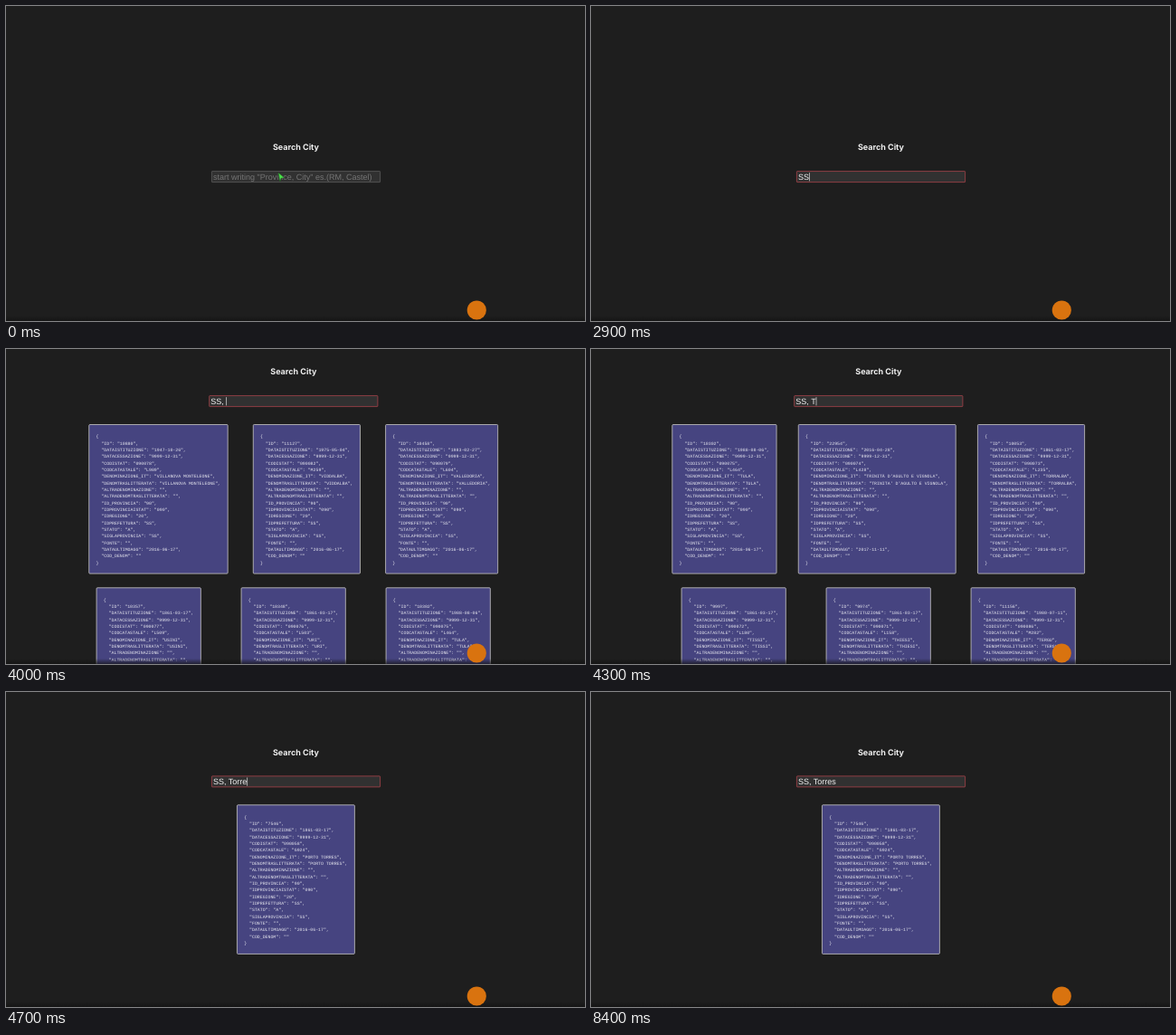
Recreate the animation shown at these times as an HTML page. Size 640x348 px, loop 8.9 s.

```html
<!DOCTYPE html>
<html lang="en">
<head>
<meta charset="utf-8">
<title>Search City</title>
<style>
  html, body { margin: 0; width: 100%; height: 100%; overflow: hidden; background: #1e1e1e; }
  svg { display: block; width: 640px; height: 348px; }
  text { white-space: pre; text-rendering: geometricPrecision; }
  .title { font: 700 9px Inter, sans-serif; fill: #f0f0f0; text-anchor: middle; }
  .field { font: 9px "Liberation Sans", Arial, sans-serif; fill: #f2f2f2; }
  #hint { fill: #757575; }
  #box { fill: #313131; stroke-width: .8; }
  .card rect { fill: #464480; stroke: #c9c8c4; stroke-width: .8; }
  .card text { font: 4.89px "Liberation Mono", "Courier New", monospace; fill: #e6e6ee; }
</style>
</head>
<body>
<svg viewBox="0 0 640 348">
  <defs>
    <linearGradient id="shade" x2="0" y2="1">
      <stop offset="0" stop-color="#111" stop-opacity="0"/>
      <stop offset="1" stop-color="#111" stop-opacity=".7"/>
    </linearGradient>
  </defs>
  <g id="page">
    <text class="title" x="320.5" y="3.4">Search City</text>
    <rect id="box" x="227.4" y="26.6" width="186.2" height="12" rx=".6"/>
    <text id="hint" class="field" x="229" y="36">start writing "Province, City" es.(RM, Castel)</text>
    <text id="value" class="field" x="229" y="36"></text>
    <rect id="caret" y="28.2" width=".7" height="9.2" fill="#ddd"/>
    <g id="cards"></g>
  </g>
  <path id="pointer" d="M301 184l6.6 5.8-3.5.4-1.2 3.8z" fill="#4be04b" stroke="#1b3a1b" stroke-width=".4"/>
  <rect y="342" width="640" height="6" fill="url(#shade)"/>
  <circle cx="520.3" cy="336" r="10.6" fill="#d9730f"/>
</svg>
<script>
const LOOP = 8900, FOCUS = 300, BLINK = 500;
const LINE = 7.34, CHAR = 4.89 * 0.6, PAD = 7.75, CARD_H = 164.6, ROW = 180.3, GRID_W = 480;
const $ = id => document.getElementById(id);

// name: [id, founded, istat code, cadastral code]
const OLD = '1861-03-17';
const cities = {
  'VILLANOVA MONTELEONE': ['10880', '1947-10-26', '090078', 'L989'],
  'VIDDALBA': ['11127', '1975-05-04', '090082', 'M259'],
  'VALLEDORIA': ['10458', '1983-02-27', '090079', 'L604'],
  'USINI': ['10357', OLD, '090077', 'L509'],
  'URI': ['10348', OLD, '090076', 'L503'],
  'TULA': ['10302', '1988-08-06', '090075', 'L464'],
  "TRINITÀ D'AGULTO E VIGNOLA": ['22954', '2016-04-28', '090074', 'L428', '2017-11-11'],
  'TORRALBA': ['10053', OLD, '090073', 'L235'],
  'TISSI': ['9997', OLD, '090072', 'L180'],
  'THIESI': ['9974', OLD, '090071', 'L158'],
  'TERGU': ['11156', '1980-07-11', '090086', 'M282'],
  'PORTO TORRES': ['7546', OLD, '090058', 'G924']
};
const names = Object.keys(cities);
const all = names.slice(0, 6), withT = names.slice(5, 11);
const pair = ['TORRALBA', 'PORTO TORRES'], one = ['PORTO TORRES'];

// [start, typed text, results, page top, page shift]
const steps = [
  [0, '', [], 156, 0],
  [FOCUS, '', [], 156, 0],
  [1800, 'S', [], 156, 0],
  [1900, 'SS', [], 156, 0],
  [3000, 'SS,', all, 25, -2.7],
  [3700, 'SS, ', all, 25, -2.7],
  [4100, 'SS, T', withT, 25, -2.7],
  [4400, 'SS, To', pair, 66.3, 0],
  [4500, 'SS, Tor', pair, 66.3, 0],
  [4600, 'SS, Torr', pair, 66.3, 0],
  [4700, 'SS, Torre', one, 66.3, 0],
  [4900, 'SS, Torres', one, 66.3, 0]
];

function record(name) {
  const [id, founded, istat, cadastral, updated = '2016-06-17'] = cities[name];
  return JSON.stringify({
    ID: id, DATAISTITUZIONE: founded, DATACESSAZIONE: '9999-12-31',
    CODISTAT: istat, CODCATASTALE: cadastral,
    DENOMINAZIONE_IT: name, DENOMTRASLITTERATA: name.replace('À', "A'"),
    ALTRADENOMINAZIONE: '', ALTRADENOMTRASLITTERATA: '',
    ID_PROVINCIA: '90', IDPROVINCIAISTAT: '090', IDREGIONE: '20',
    IDPREFETTURA: 'SS', STATO: 'A', SIGLAPROVINCIA: 'SS',
    FONTE: '', DATAULTIMOAGG: updated, COD_DENOM: ''
  }, null, 2).split('\n');
}

function card(lines, w, x, y) {
  const rows = lines.map((s, i) => `<text x="${PAD}" y="${14.8 + i * LINE}">${s}</text>`);
  return `<g class="card" transform="translate(${x} ${y})">
    <rect width="${w}" height="${CARD_H}" rx="1"/>${rows.join('')}</g>`;
}

// Rows of up to three cards with equal space around each
function grid(list) {
  let html = '';
  for (let r = 0; r * 3 < list.length; r++) {
    const row = list.slice(r * 3, r * 3 + 3).map(record);
    const widths = row.map(l => Math.max(...l.map(s => s.length)) * CHAR + 2 * PAD);
    const gap = (GRID_W - widths.reduce((a, b) => a + b)) / row.length;
    let x = 320.4 - GRID_W / 2 + gap / 2;
    row.forEach((lines, i) => {
      html += card(lines, widths[i], x, 58.5 + r * ROW);
      x += widths[i] + gap;
    });
  }
  return html;
}

let shown;
function show(step) {
  const [start, text, results, top, shift] = step;
  $('page').setAttribute('transform', `translate(${shift} ${top})`);
  $('box').setAttribute('stroke', start < FOCUS ? '#5c5c5c' : '#a8434b');
  $('hint').style.display = text ? 'none' : '';
  $('value').textContent = text;
  $('caret').setAttribute('x', 229 + (text ? $('value').getComputedTextLength() : 0));
  if (!shown || shown[2] !== results) $('cards').innerHTML = grid(results);
  shown = step;
}

function frame() {
  const t = performance.now() % LOOP;
  const step = steps.findLast(s => s[0] <= t);
  if (step !== shown) show(step);
  const lit = t >= FOCUS && Math.floor((t - step[0]) / BLINK) % 2 === 0;
  $('caret').style.display = lit ? '' : 'none';
  $('pointer').style.display = t < 500 ? '' : 'none';
  requestAnimationFrame(frame);
}
frame();
</script>
</body>
</html>
```
